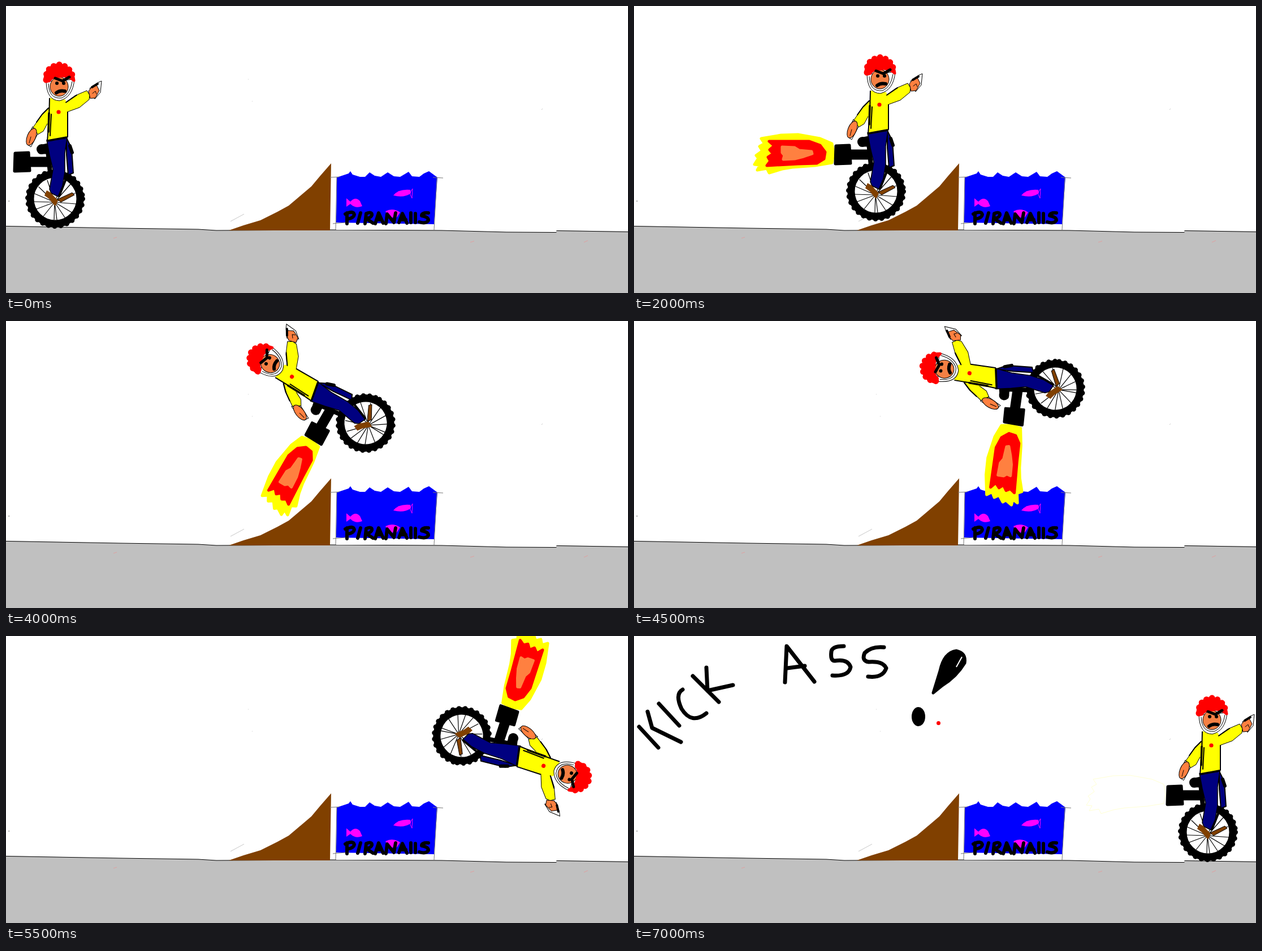
Animation, 1100 px wide and 509 px high, one loop 7.5 s. Source, as an HTML page:

```html
<!DOCTYPE html>
<html lang="en">
<head>
<meta charset="utf-8">
<title>Unicycle jump</title>
<style>
  html, body { margin: 0; width: 100%; height: 100%; overflow: hidden; background: #fff; }
  svg { display: block; width: 1100px; height: 509px; }
  .line { fill: none; stroke: #000; stroke-linecap: round; stroke-linejoin: round; }
  .faint { fill: none; stroke: #c8c8c8; }
  .blob { stroke-width: 5; stroke-linejoin: round; }
</style>
</head>
<body>
<svg viewBox="0 0 1100 509">
  <defs>
    <path id="flameShape" d="M-116 248L-81 242L-51 241L-12 248L9 257L12 275L9 291L-21 296L-61 299L-79 302L-102 309L-106 301L-123 304L-118 295L-128 294L-121 283L-125 278L-114 270L-119 262L-110 257Z"/>
  </defs>

  <g id="scene">
    <path fill="#c0c0c0" d="M0 390L200 394L340 396L372 398L575 397L770 398L885 401L973 401V398L1100 400V509H0Z"/>
    <path class="line" stroke-width="1" d="M0 390.5L200 394L340 396L372 398L575 397L770 398L885 401L973 401.5M974 398.5L1100 400.5"/>
    <path fill="#804000" d="M394 398L420 389L450 380L480 365L500 354L520 337L540 320L555 302L575 279L573 398Z"/>
    <path class="faint" d="M397 382L421 369M947 184l2 -2M428 130h1M435 169h1"/>
    <path fill="none" stroke="#e0a0a0" d="M190 412l6 -2M821 419l7 -2M1022 419l7 -3"/>
    <path class="line" d="M5 346h.5"/>

    <path fill="#fff" d="M584 384H758V397H584Z"/>
    <path fill="#00f" d="M585 304L597 300L606 297L609 293L613 299L626 303H635L643 295L652 301L663 303L675 295L686 302L697 303L712 294L718 302L731 303L739 297L748 293L763 304L757 387L584 384Z"/>
    <path fill="none" stroke="#777" d="M573 304L590 303M755 304L773 305M585 303L583 397M762 304L757 397M578 386L600 384"/>
    <g fill="#f0f">
      <path d="M602 341L609 347Q618 337 626 346L630 355Q618 360 609 351L602 356Z"/>
      <path d="M685 336Q694 324 715 326L716 332Q704 341 685 336Z"/>
      <path d="M671 364Q684 357 697 366L691 375H678Z"/>
      <path fill="none" stroke="#f0f" d="M714 332L719 324L718 341Z"/>
    </g>
    <path class="line" stroke-width="6" d="M603 386V367M600 369Q614 362 616 370Q615 376 604 378M627 367L622 385M635 386L637 368Q648 364 647 371Q645 376 637 377L649 385M653 386L659 367L667 385M655 379H664M672 386L674 369L686 384L689 367M695 384L701 368L709 385M697 379H707M716 367V384M724 368V384M747 367Q735 366 735 372Q747 374 747 380Q743 387 731 383"/>
  </g>

  <g id="rider">
    <g id="flame">
      <use href="#flameShape" class="blob" fill="#ff0" stroke="#ff0"/>
      <path class="blob" fill="#f00" stroke="#f00" d="M-102 253H-31L-12 260L-3 272L-5 284L-18 292L-51 293L-106 296L-100 288L-104 281L-95 275L-101 268L-93 261Z"/>
      <path class="blob" fill="#ff8040" stroke="#ff8040" d="M-79 263L-57 264L-49 269L-27 271L-26 275L-41 280L-57 284L-77 285L-75 278L-79 273Z"/>
    </g>
    <use id="smoke" href="#flameShape" fill="none" stroke="#ffffd4"/>

    <!-- Wheel -->
    <circle cx="87" cy="342" r="44" fill="#fff" stroke="#000" stroke-width="13"/>
    <circle class="line" cx="87" cy="342" r="48.5" stroke-width="9" stroke-dasharray="0 11"/>
    <path class="line" stroke-width="1.2" d="M86 348L51 333M86 348L49 347M86 348L54 360M86 348L66 373M86 348L85 379M86 348L90 379M86 348L104 375M86 348L116 366M86 348L124 351M86 348L122 332M86 348L114 316M86 348L102 309M86 348L73 309M86 348L58 321"/>

    <!-- Engine and frame -->
    <path class="blob" stroke="#000" d="M16 261L40 260L42 292L15 293ZM43 270H74V283H43ZM60 249L74 246V260H60Z"/>
    <circle cx="63" cy="254" r="9"/>
    <path class="line" stroke-width="8" d="M74 256L78 296"/>
    <path class="line" stroke-width="4" d="M112 292L94 337M70 298L103 304"/>

    <!-- Legs and shoes -->
    <path fill="#000080" stroke="#000" stroke-width="2" d="M107 234L116 252L119 296L110 300L107 264Z"/>
    <path class="line" stroke-width="6" d="M113 248L117 260"/>
    <path fill="#804000" stroke="#000" d="M91 343L117 331L121 335L97 348Z"/>
    <path fill="#000080" stroke="#000" stroke-width="1.5" d="M72 238L77 265L83 290L77 325L80 332L92 338L100 319L104 295L104 262L108 234Z"/>
    <path fill="#804000" d="M72 327L79 331L92 345L87 355L76 342L68 336Z"/>
    <circle cx="88" cy="350" r="2" fill="#804000"/>

    <!-- Arms and shirt -->
    <path fill="#ff0" stroke="#000" d="M76 181L62 195L48 215L56 228L66 222L75 205Z"/>
    <path fill="#ff0" stroke="#000" d="M104 172L122 159L143 150L148 158L147 166L130 180L108 188Z"/>
    <path fill="#ff0" d="M77 163L105 166L110 180L108 234L73 240L73 205L76 180Z"/>
    <path class="line" stroke-width="2" d="M77 164L76 205L73 239M80 192L78 230M109 188L109 232M106 171L125 158M75 181L64 192L54 206"/>
    <path class="line" stroke-width="3.5" d="M74 239L107 233M76 190L75 223"/>
    <circle cx="93" cy="188" r="3.6" fill="#f00"/>
    <path fill="#fff" stroke="#000" d="M47 214L39 231L37 245L44 250L56 227Z"/>
    <ellipse cx="45" cy="232" rx="7.5" ry="16" fill="#ff8040" stroke="#000" transform="rotate(22 45 232)"/>
    <path class="line" stroke-width="1" d="M41 243L44 232"/>
    <path fill="#fff" stroke="#000" d="M148 146L162 136L169 133L167 153L157 165Z"/>
    <path fill="#ff8040" stroke="#000" d="M146 151L152 143L160 140L165 150L158 163L149 164Z"/>
    <path class="line" stroke-width="4" d="M152 144L162 138"/>
    <path class="line" stroke-width="1" d="M153 155L158 151L160 156"/>

    <!-- Head -->
    <path fill="#fff" stroke="#000" d="M71 134Q72 168 95 168Q118 162 121 130Z"/>
    <path class="line" stroke-width="1" d="M75 138Q76 166 99 163Q114 156 117 134"/>
    <ellipse cx="94" cy="143" rx="16" ry="17" fill="#f48044" stroke="#000"/>
    <path class="blob" fill="#f00" stroke="#f00" d="M69 133Q68 109 93 104Q117 108 120 132Q108 121 93 125Q82 124 76 133Z"/>
    <path fill="none" stroke="#f00" stroke-width="11" stroke-linecap="round" stroke-dasharray="0 10" d="M71 131Q69 108 94 104Q116 107 119 131"/>
    <path class="line" stroke-width="5" d="M87 128L100 133L112 126"/>
    <path class="line" stroke-width="6" d="M90 137h.1M102 137h.1M89 154Q95 149 104 151"/>
  </g>

  <g id="cheer">
    <path class="line" stroke-width="7" d="M9 161L43 198M24 134L32 163L83 188M44 120L80 159M86 95Q72 103 84 129Q102 158 128 137M104 71L150 117M128 56L130 97L175 87M267 82L270 18L319 81M271 57L302 53M371 18Q350 18 349 28Q347 44 355 44Q378 40 383 55Q380 72 351 70M442 20Q420 18 408 30Q402 44 415 46Q440 44 446 57Q440 75 414 72"/>
    <path class="blob" stroke="#000" d="M529 101L541 62Q548 29 570 26Q588 30 585 48Q570 73 545 88Z"/>
    <path fill="none" stroke="#fff" stroke-width="2" d="M580 37L570 55"/>
    <ellipse cx="503" cy="143" rx="12" ry="17"/>
    <circle cx="538.5" cy="154.5" r="3.5" fill="#f00"/>
  </g>
</svg>
<script>
  // Wheel centre and backflip angle, one pose per half second.
  const poses = [
    [87, 342, 0], [185, 340, 0], [206, 340, 0], [371, 346, 0], [428, 329, 0],
    [457, 313, 0], [479, 293, 0], [628, 222, 25], [636, 181, 60], [745, 120, 82],
    [757, 85, 150], [806, 177, 252], [955, 314, 338], [987, 347, 0], [1015, 348, 0]
  ];
  const stepTime = 500;
  const part = id => document.getElementById(id);
  const show = (id, visible) => part(id).style.display = visible ? "" : "none";

  function draw(now) {
    const step = Math.floor(now / stepTime) % poses.length;
    const landed = step === poses.length - 1;
    const [x, y, angle] = poses[step];
    part("rider").setAttribute("transform",
      `translate(${x} ${y}) rotate(${-angle}) translate(-87 -342)`);
    show("flame", step > 0 && !landed);
    show("smoke", landed);
    show("cheer", landed);
  }

  const start = performance.now();
  function tick() {
    draw(performance.now() - start);
    requestAnimationFrame(tick);
  }
  tick();
</script>
</body>
</html>
```
